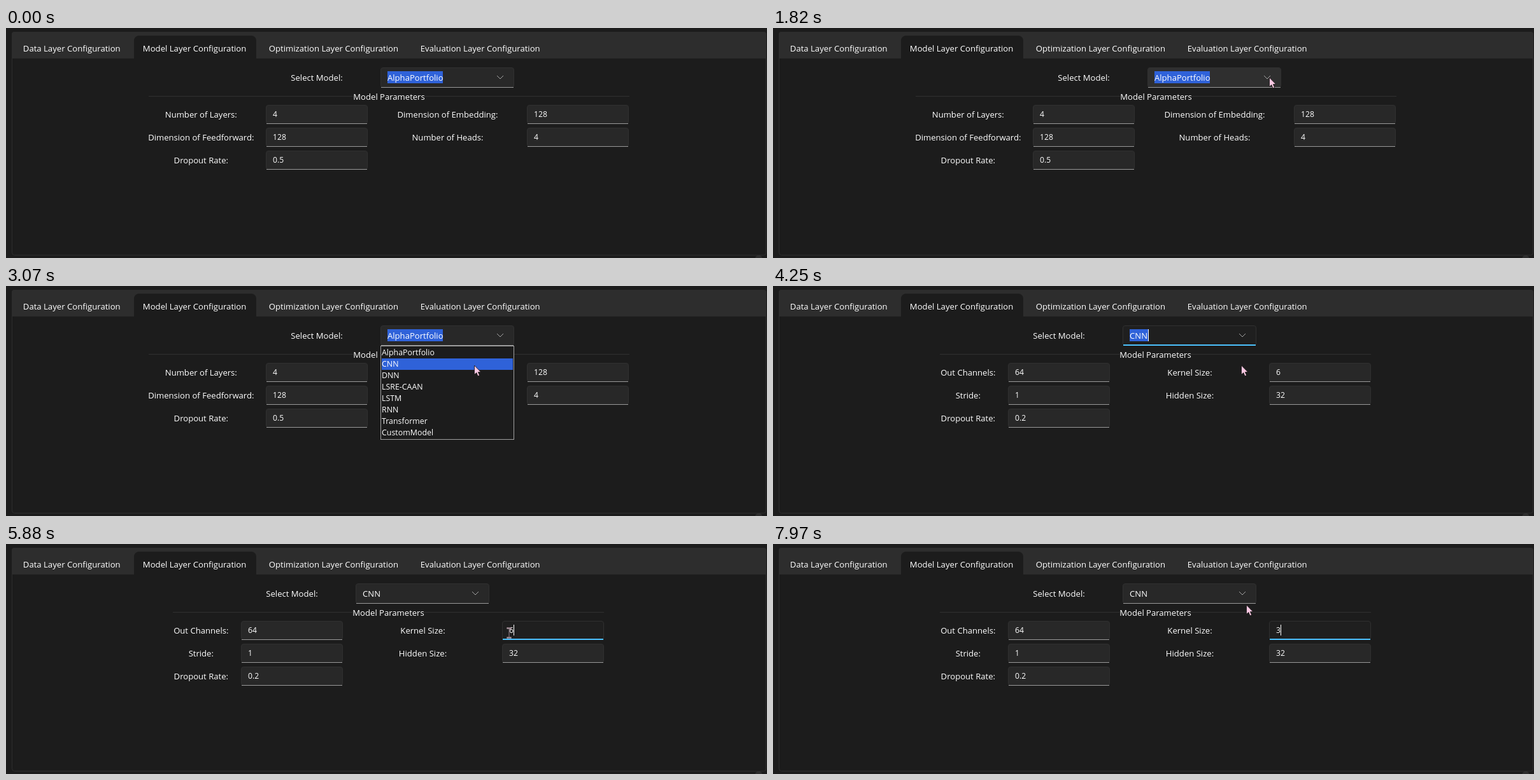
Recreate the animation shown at these times as an HTML page. Size 1195x362 px, loop 7990 ms.

```html
<!DOCTYPE html>
<html lang="en">
<head>
<meta charset="utf-8">
<title>Model configuration</title>
<style>
  html, body { margin: 0; width: 100%; height: 100%; overflow: hidden; background: #1c1c1c; }
  svg { display: block; width: 1195px; height: 362px; }
  text { font-family: "Open Sans", "Noto Sans", sans-serif; font-size: 13.1px; fill: #fff; white-space: pre; }
  .tab { font-size: 13.15px; }
  .mid { text-anchor: middle; }
  .value { font-size: 12.2px; }
  .item { font-size: 12.4px; }
  .rule { stroke: #303030; }
  .box { fill: #282828; stroke: #303030; }
  .hover .box { fill: #2f2f2f; }
  .focus .box { fill: #1f1f1f; }
  .base { stroke: #9a9a9a; }
  .focus .base { stroke: #4cc2ff; stroke-width: 2; transform: translateY(-.5px); }
  .chevron { fill: none; stroke: #a4a4a4; }
  .mark { fill: #2f62d9; }
  .caret { fill: #fff; }
</style>
</head>
<body>
<svg viewBox="0 0 1195 362">
  <rect x="9.5" y="6.5" width="1184" height="351" rx="4" fill="#1c1c1c" stroke="#2d2d2d"/>
  <path d="M9 48V10a4 4 0 0 1 4-4H1190a4 4 0 0 1 4 4V48Z" fill="#2d2d2d"/>
  <path d="M201 48V20a8 8 0 0 1 8-8H385a8 8 0 0 1 8 8V48Z" fill="#1c1c1c"/>
  <circle cx="1182" cy="363" r="5.5" fill="#2d2d2d"/>
  <text class="tab" x="26.8" y="37">Data Layer Configuration</text>
  <text class="tab" x="214.8" y="37">Model Layer Configuration</text>
  <text class="tab" x="412.8" y="37">Optimization Layer Configuration</text>
  <text class="tab" x="650.8" y="37">Evaluation Layer Configuration</text>
  <g id="forms"></g>
  <clipPath id="popupClip"><rect x="588" y="94" width="210" height="148"/></clipPath>
  <g clip-path="url(#popupClip)"><g id="popup"></g></g>
  <g id="cursor">
    <path id="arrow" d="M.5 0V14.5L3.8 11.5L6 16.8L8.6 15.7L6.4 10.6H10.8Z" fill="#fac8e2" stroke="#111" stroke-width=".8"/>
    <g id="beam" fill="none">
      <path id="stem" d="M-3.5 -7.5H-1L0 -6.5L1 -7.5H3.5M0 -6.5V6.5M-3.5 7.5H-1L0 6.5L1 7.5H3.5" stroke="#a8929d" stroke-width="2"/>
      <use href="#stem" style="stroke: #111"/>
      <path d="M0 -6.5V6.5" stroke="#111"/>
    </g>
  </g>
</svg>
<script>
const LOOP = 7990;
const $ = id => document.getElementById(id);
const show = (el, on) => { el.style.display = on ? "" : "none"; };

const label = (x, y, s) => `<text class="mid" x="${x}" y="${y}">${s}</text>`;
const bar = (name, x, y, w, h) => `<rect class="${name}" x="${x}" y="${y}" width="${w}" height="${h}"/>`;

function frame(x, y, w, h, inner) {
  return `<g class="field" data-x="${x}" data-y="${y}" data-w="${w}" data-h="${h}">
    <rect class="box" x="${x + .5}" y="${y + .5}" width="${w - 1}" height="${h - 1}" rx="3.5"/>
    <path class="base" d="M${x + 1} ${y + h - .5}H${x + w - 1}"/>${inner}</g>`;
}

const input = (x, y, value) =>
  frame(x, y, 160, 30, bar("mark", x + 11, y + 6, 8, 17) +
    `<text class="value" x="${x + 11}" y="${y + 19}">${value}</text>` + bar("caret", x + 18, y + 6, 1, 17));

function form(f) {
  const x = f.combo;
  let s = label(x - 100, 83, "Select Model:");
  s += frame(x, 62, 210, 32, bar("mark", x + 11, 68, f.markWidth, 19) +
    `<text x="${x + 11}" y="83">${f.model}</text>` + bar("caret", x + 40, 68, 1, 19) +
    `<path class="chevron" d="M${x + 183} 75l5 5l5 -5"/>`);
  s += `<path class="rule" d="M${f.left} 107.5H${f.title - 56}M${f.title + 56} 107.5H${f.right}"/>`;
  s += label(f.title + .5, 113, "Model Parameters");
  f.params.forEach(([name, value], i) => {
    const col = i % 2, y = 121 + 36 * (i >> 1);
    s += label(col ? x + 105.5 : 306.3, y + 20, name + ":") + input(x - 180 + 410 * col, y, value);
  });
  return `<g>${s}</g>`;
}

$("forms").innerHTML = form({
  combo: 588, model: "AlphaPortfolio", markWidth: 87, left: 224, right: 979, title: 601,
  params: [["Number of Layers", 4], ["Dimension of Embedding", 128], ["Dimension of Feedforward", 128],
    ["Number of Heads", 4], ["Dropout Rate", 0.5]]
}) + form({
  combo: 549, model: "CNN", markWidth: 30, left: 262, right: 939, title: 600,
  params: [["Out Channels", 64], ["Kernel Size", 6], ["Stride", 1], ["Hidden Size", 32], ["Dropout Rate", 0.2]]
});

const models = ["AlphaPortfolio", "CNN", "DNN", "LSRE-CAAN", "LSTM", "RNN", "Transformer", "CustomModel"];
$("popup").innerHTML =
  `<rect x="588.5" y="94.5" width="209" height="147" fill="#1c1c1c" stroke="#a0a0a0"/>` +
  `<rect id="row" class="mark" x="590" width="206" height="18"/>` +
  models.map((m, i) => `<text class="item" x="590" y="${109 + 18 * i}">${m}</text>`).join("");

const [alpha, cnn] = $("forms").children;
const forms = [alpha, cnn].map(g => [...g.querySelectorAll(".field")]);
const [combo, , kernel] = forms[1];
const part = (field, name) => field.querySelector("." + name);
document.querySelectorAll(".field .caret, .field .mark").forEach(el => show(el, false));
show(part(forms[0][0], "mark"), true);

// Pointer stops: time, x, y
const path = [
  [450, 1155, 360], [1120, 859, 116], [1220, 859, 116], [1240, 845, 102], [1860, 778, 78],
  [2740, 778, 78], [3070, 735, 125], [4890, 735, 125], [5380, 824, 139], [5600, 824, 139],
  [5950, 786, 140], [6080, 786, 141], [6350, 771, 194], [6590, 771, 209], [7190, 771, 209],
  [7320, 777, 220], [7500, 777, 220], [7970, 743, 96]
];

function pointer(t) {
  const i = path.findIndex(p => p[0] > t);
  if (i < 0) return path[path.length - 1].slice(1);
  if (i === 0) return path[0].slice(1);
  const [t0, x0, y0] = path[i - 1], [t1, x1, y1] = path[i];
  const u = (t - t0) / (t1 - t0), k = (1 - Math.cos(Math.PI * u)) / 2;
  return [Math.round(x0 + (x1 - x0) * k), Math.round(y0 + (y1 - y0) * k)];
}

const blink = (t, start) => Math.floor((t - start) / 530) % 2 === 0;

function render(t) {
  const [x, y] = pointer(t);
  const isCnn = t >= 4180, open = t >= 2250 && t < 4130;
  const editing = t >= 5560, selected = t >= 5900 && t < 6340;
  show(alpha, !isCnn);
  show(cnn, isCnn);

  let beam = editing && t < 6080;
  forms[+isCnn].forEach((f, i) => {
    const d = f.dataset;
    const over = !open && t >= 450 && x >= +d.x && x < +d.x + +d.w && y >= +d.y && y < +d.y + +d.h;
    f.classList.toggle("hover", over);
    if (over && i) beam = true;
  });

  combo.classList.toggle("focus", !editing);
  show(part(combo, "mark"), !editing);
  show(part(combo, "caret"), !editing && blink(t, 4200));

  kernel.classList.toggle("focus", editing);
  part(kernel, "value").textContent = t < 6340 ? "6" : t < 6770 ? "" : "3";
  show(part(kernel, "mark"), selected);
  const caret = part(kernel, "caret");
  const atStart = t >= 5900 && t < 6770;
  caret.setAttribute("x", atStart ? 790 : 797);
  show(caret, editing && blink(t, t >= 6770 ? 6770 : t >= 6340 ? 6340 : 5560));

  show($("popup"), open);
  const roll = Math.min(1, Math.max(0, (t - 2250) / 120));
  $("popup").setAttribute("transform", `translate(0 ${Math.round(-148 * (1 - roll))})`);
  const row = t < 2740 ? 0 : Math.max(0, Math.floor((y - 96) / 18));
  $("row").setAttribute("y", 96 + 18 * row);

  show($("cursor"), t >= 450);
  $("cursor").setAttribute("transform", `translate(${x} ${y})`);
  show($("arrow"), !beam);
  show($("beam"), beam);
}

const start = performance.now();
function tick() {
  render((performance.now() - start) % LOOP);
  requestAnimationFrame(tick);
}
tick();
</script>
</body>
</html>
```
